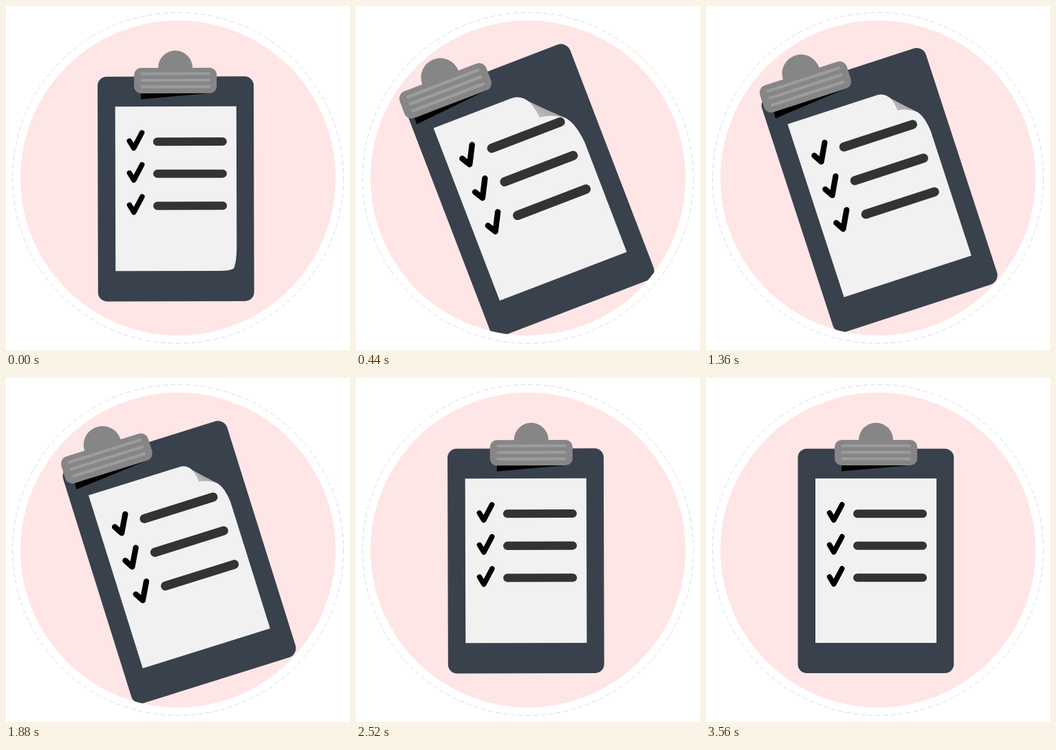
Recreate the animation shown at these times as an HTML page. Size 500 by 500 pixels, loop 3600 ms.

```html
<!DOCTYPE html>
<html lang="en">
<head>
<meta charset="utf-8">
<title>Checklist clipboard</title>
<style>
  html, body { margin: 0; width: 100%; height: 100%; overflow: hidden; background: #fff; }
  svg { display: block; width: 100vw; height: 100vh; }
</style>
</head>
<body>
<svg viewBox="0 0 500 500">
  <defs>
    <clipPath id="disc"><circle cx="250" cy="250" r="229"/></clipPath>
    <linearGradient id="shade" x1="0" y1="0.7" x2="0.6" y2="0.2">
      <stop offset="0" stop-color="#c8c8c8"/>
      <stop offset="1" stop-color="#999"/>
    </linearGradient>
  </defs>
  <circle cx="250" cy="250" r="240.5" fill="#fff" stroke="#aaa" stroke-width="0.4" stroke-dasharray="7 4"/>
  <circle cx="250" cy="250" r="229" fill="#ffe6e6"/>
  <g clip-path="url(#disc)">
    <g id="all">
      <rect x="133.500" y="102.700" width="226.700" height="326.300" rx="13" fill="#39414c"/>
      <path id="paper" fill="#f1f1f1"/>
      <g fill="none" stroke-linecap="round" stroke-linejoin="round">
        <path stroke="#000" stroke-width="7.5" d="M179.500 196l6.300 10.500 12-22.500M179.500 242.500l6.300 10.500 12-22.500M179.500 289l6.300 10.500 12-22.500"/>
        <path stroke="#333" stroke-width="12" d="M220 197.300H315M220 243.800H315M220 290.300H315"/>
      </g>
      <path id="flap" fill="url(#shade)"/>
      <g id="clamp">
        <path d="M197 126V135.500L302 126.500Z"/>
        <circle cx="247" cy="90" r="25" fill="#868686"/>
        <rect x="187" y="90" width="120" height="37" rx="10" fill="#868686"/>
        <path d="M198.500 98.500H296M198.500 108H296M198.500 117.500H296" stroke="#9c9c9c" stroke-width="4" stroke-linecap="round"/>
      </g>
    </g>
  </g>
</svg>
<script>
const LOOP = 3600, TILT = 18, SLIDE = 50.6;
const el = id => document.getElementById(id);
const all = el('all'), paper = el('paper'), flap = el('flap'), clamp = el('clamp');
const mix = (a, b, u) => a + (b - a) * u;
const limit = u => Math.min(1, Math.max(0, u));
const inOut = u => u < 0.5 ? 2 * u * u : 1 - 2 * (1 - u) * (1 - u);

// damped swing from 0 to 1; first crosses 1 at `rise` seconds
function swing(t, rise, speed, decay) {
  return 1 + Math.exp(-decay * t) * Math.sin(speed * (t - rise)) / Math.sin(speed * rise);
}

// keys: [time, value] pairs
function track(t, keys) {
  for (let i = 1; i < keys.length; i++) {
    const [t0, v0] = keys[i - 1], [t1, v1] = keys[i];
    if (t < t1) return mix(v0, v1, inOut(limit((t - t0) / (t1 - t0))));
  }
  return keys[keys.length - 1][1];
}

const boardBack = [[1770, 1], [2640, -0.03], [3040, 0]];
const clampBack = [[1960, 1], [2520, -0.16], [2800, 0.03], [3040, 0]];

// outline points of a curled corner of size c; dir is 1 at the top, -1 at the bottom
function corner(c, y, dir) {
  const g = limit((c - 24) / 26);
  const at = (x, d) => (335 + x * c).toFixed(2) + ' ' + (y + dir * d * c).toFixed(2);
  const open = (x, d) => at(mix(-0.15, x, g), mix(0.12, d, g));
  return {
    start: at(-1, 0), bendIn: at(mix(-0.4, -0.81, g), 0), a: open(-0.7, 0.19),
    fold: open(-0.45, 0.46), b: open(-0.17, 0.72),
    bendOut: at(mix(-0.01, -0.03, g), mix(0.5, 0.88, g)), end: at(0, 1.28),
    tip: open(-0.63, 0.53), tipIn: open(-0.64, 0.34), tipOut: open(-0.4, 0.54)
  };
}

function draw(ms) {
  const s = ms / 1000;
  const p = ms < 1770 ? swing(s, 0.16, 6.83, 4.2) : track(ms, boardBack);
  const q = ms < 1770 ? swing(s, 0.13, 7.85, 4.3) : track(ms, clampBack);

  const size = 1 + 0.106 * p;
  all.setAttribute('transform',
    `translate(250 250) rotate(${-TILT * p}) scale(${size}) translate(-250 -250)`);
  clamp.setAttribute('transform', `translate(${-SLIDE * q} ${-1.8 * q})`);

  const top = corner(Math.max(0, 52 * p + 47 * Math.max(0, p - 1)), 146, 1);
  const low = corner(26 * limit(1 - ms / 140), 385, -1);
  paper.setAttribute('d', `M159 146L${top.start}Q${top.bendIn} ${top.a}Q${top.fold} ${top.b}` +
    `Q${top.bendOut} ${top.end}L${low.end}Q${low.bendOut} ${low.b}L${low.a}` +
    `Q${low.bendIn} ${low.start}L159 385Z`);
  flap.setAttribute('d', `M${top.a}Q${top.tipIn} ${top.tip}Q${top.tipOut} ${top.b}` +
    `Q${top.fold} ${top.a}Z`);
}

const begin = performance.now();
function frame() {
  draw((performance.now() - begin) % LOOP);
  requestAnimationFrame(frame);
}
draw(0);
requestAnimationFrame(frame);
</script>
</body>
</html>
```
